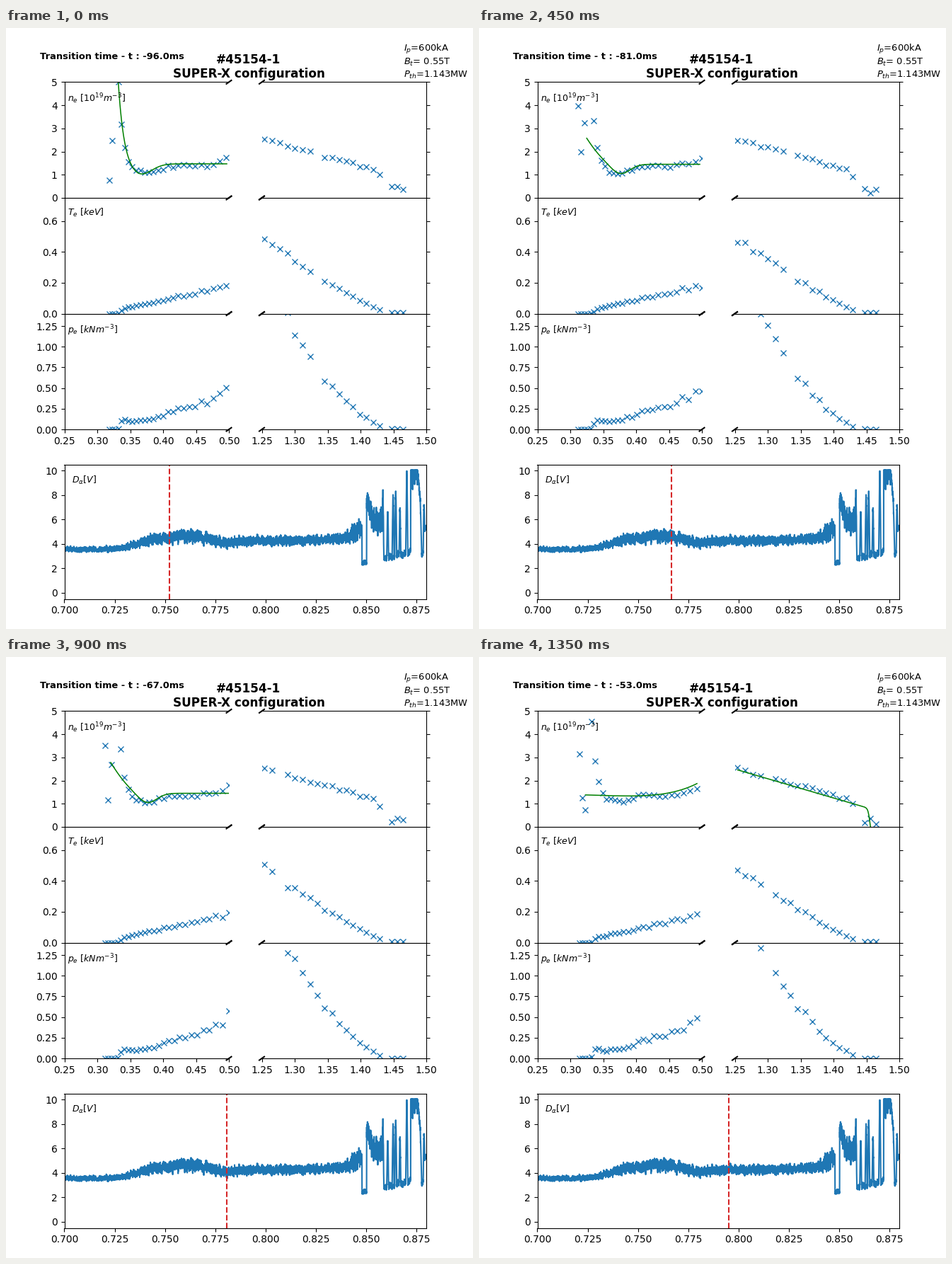
A matplotlib script that plays this animation: 660 px wide and 849 px high, repeating every 1.5 s.

```python
import numpy as np
import matplotlib.pyplot as plt
from matplotlib.animation import FuncAnimation

W, H, DPI = 660, 849, 100
FRAMES, STEP_MS = 10, 150
BLUE = "tab:blue"

fig = plt.figure(figsize=(W / DPI, H / DPI), dpi=DPI, facecolor="white")


def box(x0, y0, x1, y1):
    return fig.add_axes([x0 / W, 1 - y1 / H, (x1 - x0) / W, (y1 - y0) / H])


def label(x, y, text, **kw):
    return fig.text(x / W, 1 - y / H, text, va="baseline", **kw)


def step(x, c, w):
    return .5 * (1 + np.tanh((x - c) / (2 * w)))


def bump(x, c, w):
    return np.exp(-((x - c) / w) ** 2)


def softplus(x, c, w):
    """Ramp that falls with slope -1/w and levels out at c."""
    return np.logaddexp(0, (c - x) / w)


# ---- measured profiles
LASERS = [0, 1, 2, 3, 0, 1, 3, 0, 1, 2]


def inner(k, rng):
    j = np.arange(-1, 26)
    x = .4962 - .01011 * j + .00012 * j ** 2 - .00205 * LASERS[k]
    x = x[x < .502]
    n = (1.07 + .3 * step(x, .396, .006) + 150 * np.clip(x - .45, 0, None) ** 2
         + 2 * np.exp((.337 - x) / .0075))
    n += rng.uniform(-.07, .07, x.size)
    n = np.where(x < .324, rng.uniform(.2, 4, x.size), n)
    t = (.035 + .93 * (x - .3414)) * step(x, .336, .0015)
    return x, n, t * rng.uniform(.92, 1.08, x.size)


def outer(k, rng):
    m = np.arange(21)
    x = 1.2543 + .01159 * m - 2.72e-6 * m ** 3
    n = (2.52 - 7.9 * (x - 1.2543)) * step(-x, -1.435, .004)
    n += rng.uniform(-.07, .07, x.size)
    n = np.where(x > 1.44, rng.uniform(.1, .5, x.size), n)
    t = .008 + .47 * (np.clip(1.44 - x, 0, None) / .186) ** 1.18
    t *= rng.uniform(.94, 1.06, x.size)
    keep = (m != 17) & (rng.random(x.size) > .08)
    return x[keep], n[keep], t[keep]


# ---- fitted curves
def steep_dip(x):
    return 1.47 - .5 * bump(x, .364, .025) + 1.4 * np.exp((.34 - x) / .0085)


def soft_dip(x):
    return 1.45 - .43 * bump(x, .376, .02) + .55 * softplus(x, .346, .011)


def hollow(x):
    return 1.54 - .33 * bump(x, .382, .037)


def line(x):
    return 1.2 + 3.2 * (x - .3237)


def spike(x):
    return 1.37 + (185 * (x - .3075) - 1.37) * step(-x, -.337, .0022)


def rise(x):
    return 1.17 + .5 * ((x - .3145) / .18) ** 4


def sag(x):
    return 1.38 - .9 * (x - .323) + .65 * ((x - .323) / .17) ** 4


def pedestal(top, slope, edge, width, floor):
    return lambda x: floor + (top - slope * (x - 1.2543) - floor) * step(-x, -edge, width)


def pressure(x):
    return .106 * softplus(x, 1.409, .009)


# curve, first x, last x
INNER_FITS = [(steep_dip, .32, .4968), (hollow, .314, .494), (line, .3237, .492),
              (soft_dip, .325, .4968), (spike, .3075, .4968), (rise, .324, .494),
              (soft_dip, .3204, .5), (soft_dip, .319, .4968), (rise, .3145, .494),
              (sag, .323, .4925)]
OUTER_FITS = {1: (pedestal(2.54, 7.65, 1.4295, .0004, .21), 1.2543, 1.4726),
              9: (pedestal(2.46, 8.3, 1.4555, .0015, -.5), 1.2543, 1.4565)}
PRESSURE_FITS = {1: (pressure, 1.2543, 1.4726)}


def curve(fit):
    if fit is None:
        return [], []
    f, lo, hi = fit
    x = np.linspace(lo, hi, 400)
    return x, f(x)


# ---- D-alpha trace: slow drift, then bursts
SPIKES = [(.8584, 7.4), (.8608, 6.7), (.8635, 8), (.8648, 8.1), (.8669, 6.8),
          (.8703, 10), (.8789, 7.2)]


def d_alpha():
    rng = np.random.default_rng(7)
    t = np.linspace(.7, .88, 6000)
    drift = (3.58 + .65 * step(t, .734, .003) + .35 * bump(t, .76, .017)
             - .25 * bump(t, .78, .004) + .2 * step(t, .825, .004)
             + .8 * step(t, .8435, .0015))
    low = 2.45 + 40 * (t - .85)
    decay = 5.3 + 2.7 * np.exp((.8503 - t) / .003)
    early, first = t < .848, (t > .8503) & (t < .8587)
    top, tail = (t > .8722) & (t < .8758), t > .8791
    fall = np.interp(t, [.8758, .877, .8777], [9.8, 7.6, 3.2])
    y = np.select([early, first, top, tail, t > .8758],
                  [drift, decay, 9.9, 5.3, fall], low)
    for c, h in SPIKES:
        y = np.maximum(y, h * bump(t, c, .0005))

    amp = (.1 + .07 * step(t, .735, .004) + .06 * bump(t, .76, .015)
           + .15 * step(t, .841, .001))
    amp = np.select([early, first | top], [amp, .45], .12)
    white = np.clip(rng.normal(size=t.size), -2.4, 2.4)
    wander = np.convolve(rng.normal(size=t.size), np.ones(25) / 5, "same")
    return t, np.clip(y + amp * (white + .45 * wander), 2.3, 10.05)


# ---- layout
marks, fits = [], []
PANELS = [(r"$n_e\ [10^{19}m^{-3}]$", 5, 1, 0),
          (r"$T_e\ [keV]$", .75, .2, 1),
          (r"$p_e\ [kNm^{-3}]$", 1.4, .25, 2)]
for r, (name, ymax, tick, digits) in enumerate(PANELS):
    y0 = 76.41 + 163.56 * r
    for c, (x0, x1, lo) in enumerate([(82.5, 315, .25), (361.5, 594, 1.25)]):
        ax = box(x0, y0, x1, y0 + 163.56)
        ax.set(xlim=(lo, lo + .25), ylim=(0, ymax), xticks=lo + np.arange(6) * .05,
               yticks=np.arange(0, ymax + .01, tick))
        ax.xaxis.set_major_formatter("{x:.2f}")
        ax.yaxis.set_major_formatter(f"{{x:.{digits}f}}")
        if r < 2:
            ax.tick_params(bottom=False, labelbottom=False)
        if c:
            ax.yaxis.tick_right()
            ax.tick_params(labelright=False)
        else:
            ax.text(.02, .918, name, transform=ax.transAxes, fontsize=9, va="top")
        ax.spines["left" if c else "right"].set_visible(False)
        for y in (0, 1):
            ax.plot([1 - c - .015, 1 - c + .015], [y - .015, y + .015], "k",
                    transform=ax.transAxes, clip_on=False)
        marks.append(ax.plot([], [], "x", color=BLUE)[0])
        fits.append(ax.plot([], [], color="green", lw=1.1)[0])

da = box(82.5, 616.7, 594, 806.55)
da.set(xlim=(.7, .88), ylim=(-.5, 10.5), xticks=.7 + np.arange(8) * .025,
       yticks=np.arange(0, 11, 2))
da.xaxis.set_major_formatter("{x:.3f}")
da.plot(*d_alpha(), color=BLUE)
da.text(.02, .86, r"$D_{\alpha}[V]$", transform=da.transAxes, fontsize=9)
cursor = da.axvline(.75, color="tab:red", ls="--")

clock = label(48, 44, "", fontsize=9.35, weight="bold")
for y, s in [(50.5, "#45154-1"), (70.5, "SUPER-X configuration")]:
    label(343, y, s, fontsize=12.2, weight="bold", ha="center")
for y, s in [(33, "$I_p$=600kA"), (52, "$B_t$= 0.55T"), (70, "$P_{th}$=1.143MW")]:
    label(561.5, y, s, fontsize=9.35)


def update(k):
    rng = np.random.default_rng(100 + k)
    for c, (x, n, t) in enumerate((inner(k, rng), outer(k, rng))):
        for r, y in enumerate((n, t, 1.602 * n * t)):
            marks[2 * r + c].set_data(x, y)
    fits[0].set_data(*curve(INNER_FITS[k]))
    fits[1].set_data(*curve(OUTER_FITS.get(k)))
    fits[5].set_data(*curve(PRESSURE_FITS.get(k)))
    cursor.set_xdata([.7523 + .00476 * k] * 2)
    clock.set_text(f"Transition time - t : {round(-95.52 + 4.77 * k):.1f}ms")
    return marks + fits + [cursor, clock]


anim = FuncAnimation(fig, update, frames=FRAMES, interval=STEP_MS, repeat=True,
                     repeat_delay=0, blit=False)
plt.show()
```
